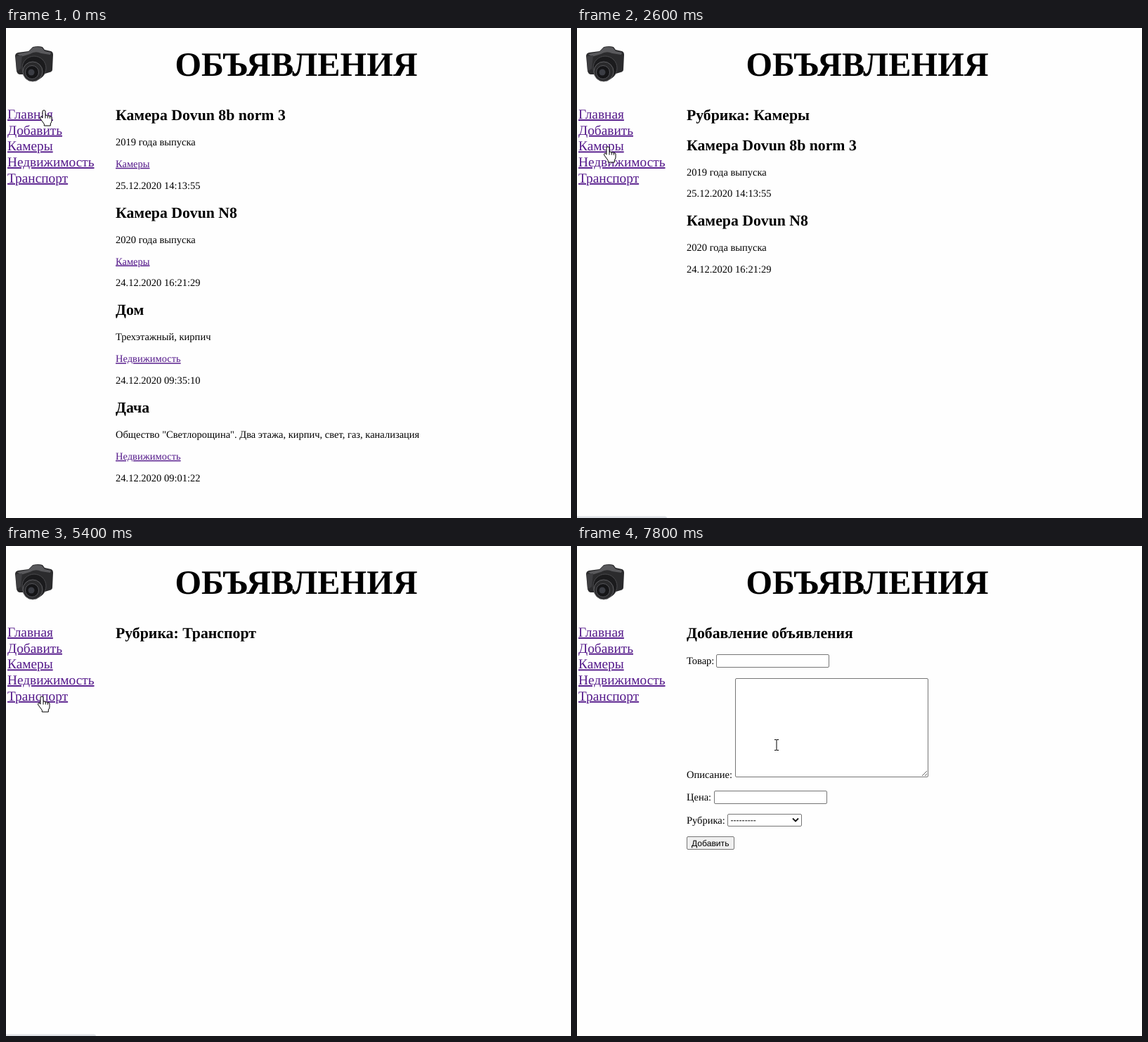
An HTML page for the animation above (8000 ms loop, 804 px wide and 697 px high).

```html
<!DOCTYPE html>
<html lang="ru">
<head>
<meta charset="utf-8">
<title>Объявления</title>
<style>
html, body { margin: 0; width: 100%; height: 100%; overflow: hidden; background: #fefefe; }
svg { display: block; width: 100%; height: 100%; }
text { font: 14.5px "Liberation Serif", serif; fill: #000; text-rendering: geometricPrecision; white-space: pre; }
.title { font-size: 48.3px; font-weight: bold; text-anchor: middle; }
.head { font-size: 21.75px; font-weight: bold; }
.link { fill: #551a8b; text-decoration: underline; }
.menu { font-size: 19.33px; }
.control { font: 12.1px "Liberation Sans", sans-serif; }
.box { fill: #fff; stroke: #767676; }
.cursor path { fill: #fff; stroke: #000; stroke-linejoin: round; }
</style>
</head>
<body>
<svg id="stage" viewBox="0 0 804 697">
  <g id="camera">
    <path fill="#2b2b2d" d="M13 40q0-4 4-5l15-2 6-6q8-2 14 0l3 4 9 2q3 1 3 5l-1 21q0 3-4 4l-10 3H20q-4 0-5-5z"/>
    <path fill="#59595c" d="M16 37l16-3 6-6q7-2 13 0l4 5 9 2-1 3-13-2q-8-4-16 1l-13 4z"/>
    <path fill="#3d3d40" d="M14 40l9-1-2 19-6 4z"/>
    <circle cx="40" cy="57" r="17" fill="#1b1b1d" stroke="#4a4a4d"/>
    <circle cx="38" cy="62" r="14" fill="#2a2a2c" stroke="#606063"/>
    <circle cx="37" cy="63" r="9.5" fill="#151517" stroke="#55555a"/>
    <circle cx="36" cy="63" r="4.5" fill="#3b3d44"/>
  </g>
  <text class="title" x="413" y="68">ОБЪЯВЛЕНИЯ</text>
  <g id="menu"></g>
  <g id="pages"></g>
  <path id="status" fill="#dee1e6"/>
  <g id="hand" class="cursor"><path d="M-4-1q2-2.5 4 0v6.5q2-1.2 3.3.5 2-.9 3 .7 2.2-.6 2.7 1.3v5q0 2-1.7 4v3h-9v-2.5l-5.5-7.5q-1-2.5 1-2.8 1 .2 2.2 1.8zM0 5.5v4M3.3 6v3.5M6.3 6.7v3"/></g>
  <g id="arrow" class="cursor"><path d="M0 0v16l3.7-3.6 2.6 6 2.4-1-2.6-6h5.2z"/></g>
  <g id="beam" class="cursor"><path d="M-3-7.5h2.5l.5.5.5-.5H3M0-7V7M-3 7.5h2.5L0 7l.5.5H3" style="fill:none"/></g>
</svg>
<script>
const LOOP = 8000, STEP = 200, LEFT = 156;
const $ = id => document.getElementById(id);
const label = (x, y, cls, str) => `<text x="${x}" y="${y}" class="${cls}">${str}</text>`;
const box = (x, y, w, h, extra = "") =>
  `<rect class="box" x="${x + .5}" y="${y + .5}" width="${w}" height="${h}" rx="1.5" ${extra}/>`;

const head = str => ["head", str];
const line = str => ["line", str];
const link = str => ["link", str];
const cameras = "Камеры", estate = "Недвижимость", transport = "Транспорт";
const ads = [
  ["Камера Dovun 8b norm 3", "2019 года выпуска", cameras, "25.12.2020 14:13:55"],
  ["Камера Dovun N8", "2020 года выпуска", cameras, "24.12.2020 16:21:29"],
  ["Дом", "Трехэтажный, кирпич", estate, "24.12.2020 09:35:10"],
  ["Дача", 'Общество "Светлорощина". Два этажа, кирпич, свет, газ, канализация', estate, "24.12.2020 09:01:22"]
];

// Stacks headings and paragraphs with the usual block margins.
function flow(items) {
  let y = 131, previous;
  return items.map(([kind, str]) => {
    const isHead = kind === "head";
    if (previous) y += previous === "head" ? (isHead ? 42.6 : 36) : (isHead ? 41 : 30.85);
    previous = kind;
    return label(LEFT, y.toFixed(2), kind, str);
  }).join("");
}

const home = flow(ads.flatMap(([name, about, rubric, date]) =>
  [head(name), line(about), link(rubric), line(date)]));

const rubricPage = rubric => flow([head("Рубрика: " + rubric),
  ...ads.filter(ad => ad[2] === rubric)
    .flatMap(([name, about, , date]) => [head(name), line(about), line(date)])]);

const form = label(LEFT, 131, "head", "Добавление объявления")
  + label(LEFT, 168, "", "Товар:") + box(198, 154, 160, 18)
  + label(LEFT, 329.5, "", "Описание:") + box(225, 188, 274, 140)
  + '<path d="M491 327l7-7M495 327l3-3" stroke="#666"/>'
  + label(LEFT, 361.5, "", "Цена:") + box(195, 348, 160, 18)
  + label(LEFT, 394.5, "", "Рубрика:") + box(214, 381, 105, 17)
  + label(218.5, 394, "control", "---------")
  + '<path d="M307 387.5l4 4 4-4" fill="none" stroke="#111" stroke-width="1.8"/>'
  + box(156, 413, 67, 18, 'style="fill:#efefef"')
  + label(163, 426.5, "control", "Добавить");

const pages = [[0, home], [2600, rubricPage(cameras)], [3800, rubricPage(estate)],
  [5200, rubricPage(transport)], [6400, form]];
$("pages").innerHTML = pages.map(([, body]) => `<g>${body}</g>`).join("");
$("menu").innerHTML = ["Главная", "Добавить", cameras, estate, transport]
  .map((str, i) => label(2, 129 + i * 22.7, "link menu", str)).join("");

// Pointer moves: start, end, x, y
const moves = [
  [0, 0, 56, 119], [600, 1800, 46, 171], [2800, 3400, 54, 193],
  [4400, 4800, 53, 216], [5400, 6000, 60, 149], [6600, 7400, 284, 283]
];
function pointer(t) {
  let x = 0, y = 0;
  for (const [start, end, toX, toY] of moves) {
    if (t < start) break;
    const p = Math.min(1, (t - start) / (end - start || 1));
    const k = end > start ? p * p * (3 - 2 * p) : 1;
    x += (toX - x) * k;
    y += (toY - y) * k;
  }
  return [x, y];
}

function draw(now) {
  const t = Math.floor(now % LOOP / STEP) * STEP;
  const current = pages.filter(([start]) => t >= start).length - 1;
  [...$("pages").children].forEach((page, i) => page.style.display = i === current ? "" : "none");
  $("menu").children[1].style.fill = t === 6200 ? "#c8101c" : "";

  const width = t >= 6000 ? 139 : 128;
  $("status").setAttribute("d", `M0 694.5h${width - 3}q3 0 3 2.5H0z`);
  $("status").style.opacity = t < 2000 || t >= 6400 ? 0 : t < 2200 ? .5 : 1;

  const [x, y] = pointer(t);
  const shape = x > 225 ? "beam" : x > 100 ? "arrow" : "hand";
  for (const id of ["hand", "arrow", "beam"]) {
    $(id).style.display = id === shape ? "" : "none";
    $(id).setAttribute("transform", `translate(${x} ${y})`);
  }
  requestAnimationFrame(() => draw(performance.now() - begin));
}
const begin = performance.now();
draw(0);
</script>
</body>
</html>
```
